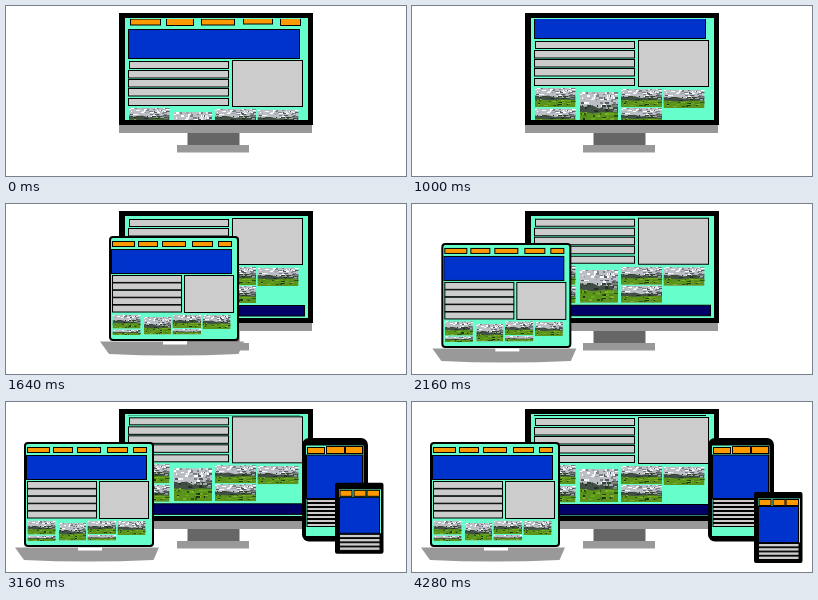
Recreate the animation shown at these times as an HTML page. Size 400 by 170 pixels, loop 8.44 s.

```html
<!DOCTYPE html>
<html lang="en">
<head>
<meta charset="utf-8">
<title>Responsive devices</title>
<style>
html, body { margin: 0; width: 100%; height: 100%; overflow: hidden; background: #fff; }
svg { display: block; width: 400px; height: 170px; }
.o { stroke: #000; stroke-width: 1; }
</style>
</head>
<body>
<svg viewBox="0 0 400 170">
  <defs>
    <symbol id="photo" viewBox="0 0 40 20" preserveAspectRatio="none"></symbol>
    <clipPath id="screen"><rect x="119" y="13" width="183" height="101"/></clipPath>
    <clipPath id="lid"><rect x="20" y="42" width="126" height="100"/></clipPath>
  </defs>
  <g id="monitor">
    <rect x="113" y="119" width="193" height="8" fill="#999"/>
    <rect x="181.500" y="127" width="52" height="12" fill="#666"/>
    <rect x="171" y="139" width="72" height="7.500" fill="#999"/>
    <rect x="113" y="7" width="194" height="112"/>
    <rect x="119" y="12" width="183" height="102" fill="#6fc"/>
    <g clip-path="url(#screen)"><g id="page"></g></g>
  </g>
  <g id="laptop">
    <path d="M9 145.500H153L147.500 158Q80 161 18 158Z" fill="#999"/>
    <rect x="72" y="145.500" width="24" height="3" fill="#fff"/>
    <rect x="19" y="41" width="128" height="103" rx="3" fill="#6fc" stroke="#000" stroke-width="2"/>
    <g id="lidPage" clip-path="url(#lid)"></g>
  </g>
  <g id="tablet">
    <rect x="296" y="36" width="66" height="103.500" rx="7"/>
    <rect x="300" y="43.500" width="57.500" height="90.500" fill="#6fc"/>
  </g>
  <g id="phone">
    <rect x="342" y="90" width="48.500" height="71" rx="2"/>
    <rect x="346" y="96.500" width="42" height="44" fill="#6fc"/>
  </g>
</svg>
<script>
const NS = 'http://www.w3.org/2000/svg';
const $ = id => document.getElementById(id);
const ORANGE = '#f90', BLUE = '#03c', GRAY = '#ccc', NAVY = '#006';

function add(parent, tag, attrs) {
  const el = document.createElementNS(NS, tag);
  for (const k in attrs) el.setAttribute(k, attrs[k]);
  parent.appendChild(el);
}
const box = (parent, fill, x, y, x2, y2) =>
  add(parent, 'rect', { x, y, width: x2 - x, height: y2 - y, fill, class: 'o' });
const buttons = (parent, y, y2, spans) =>
  spans.forEach(([a, b]) => box(parent, ORANGE, a, y, b, y2));
function rows(parent, x, x2, y, step, height, count) {
  for (let i = 0; i < count; i++) box(parent, GRAY, x, y + i * step, x2, y + i * step + height);
}
const photo = (parent, x, y, width, height) =>
  add(parent, 'use', { href: '#photo', x, y, width, height });

// Cloudy alpine meadow with seeded flecks
function drawPhoto(p) {
  let seed = 7;
  const rnd = () => (seed = seed * 16807 % 2147483647) / 2147483647;
  const flecks = (n, y, h, colors) => {
    for (let i = 0; i < n; i++) {
      add(p, 'rect', {
        x: Math.floor(rnd() * 38), y: y + Math.floor(rnd() * h), width: 1 + Math.floor(rnd() * 4), height: 1,
        fill: colors[Math.floor(rnd() * colors.length)], 'shape-rendering': 'crispEdges'
      });
    }
  };
  add(p, 'rect', { width: 40, height: 20, fill: '#bcc0c6' });
  flecks(80, 0, 9, ['#fff', '#fff', '#e4e6e8', '#7c828a', '#555b62', '#a2a8ae']);
  add(p, 'path', { d: 'M0 8L6 9L13 8L20 10L28 8L34 9L40 7V15H0Z', fill: '#414f47' });
  flecks(30, 8, 4, ['#243028', '#77807c', '#34452f', '#a0a8a8']);
  add(p, 'path', { d: 'M0 12L14 13L27 12L40 12.500V20H0Z', fill: '#5a941a' });
  flecks(36, 12, 7, ['#2f5214', '#86ad30', '#1d3310', '#6ba81e', '#4c8018']);
}

function build() {
  drawPhoto($('photo'));

  const page = $('page');
  buttons(page, 13, 19, [[124.5, 154.5], [195.5, 228.5]]);
  buttons(page, 12.5, 19.5, [[160.5, 187.5], [274.5, 294.5]]);
  buttons(page, 12, 18, [[237.5, 266.5]]);
  box(page, BLUE, 122.5, 23.5, 293.5, 52.5);
  box(page, GRAY, 123.5, 55.5, 222.5, 62.5);
  rows(page, 122.5, 222.5, 64.5, 9, 7.5, 3);
  box(page, GRAY, 122.5, 92.5, 222.5, 99.5);
  box(page, GRAY, 226.5, 54.5, 296.5, 100.5);
  photo(page, 123, 102, 40.5, 19);
  photo(page, 123, 122.5, 40.5, 17);
  photo(page, 168, 106, 38, 33);
  photo(page, 209, 103, 41, 18);
  photo(page, 209, 122, 41, 17);
  photo(page, 251.5, 103.5, 41, 18.5);
  box(page, NAVY, 122.5, 141.5, 298.5, 152);

  const lid = $('lidPage');
  buttons(lid, 45.5, 50.5, [[21.5, 43.5], [47.5, 66.5], [71.5, 94.5], [101.5, 121.5], [127.5, 140.5]]);
  box(lid, BLUE, 20.5, 53.5, 140.5, 77.5);
  rows(lid, 21.5, 90.5, 79.5, 7.4, 6.9, 5);
  box(lid, GRAY, 93.5, 79.5, 142.5, 116.5);
  photo(lid, 21.5, 118.5, 28, 14);
  photo(lid, 21.5, 133.5, 28, 5.5);
  photo(lid, 53, 121, 27, 17.5);
  photo(lid, 81.5, 118.5, 28.5, 13.5);
  photo(lid, 81.5, 133, 28.5, 5.5);
  photo(lid, 111.5, 119, 28, 14);

  const tablet = $('tablet');
  buttons(tablet, 45.5, 51.5, [[301.5, 318.5]]);
  buttons(tablet, 44.5, 51.5, [[320.5, 338.5], [339.5, 356.5]]);
  box(tablet, BLUE, 300.5, 53, 356.5, 96.5);
  rows(tablet, 301, 356.5, 97.5, 4, 3, 7);

  const phone = $('phone');
  buttons(phone, 97.5, 103.5, [[347, 359], [361, 373], [374, 386.5]]);
  box(phone, BLUE, 346.5, 104.5, 386.5, 140.5);
  rows(phone, 346.5, 387, 141.5, 4.2, 3.4, 4);
}

const FRAME = 40, LOOP = 8440, MOTION_END = 4280, SCROLL_END = 1650;
const clamp01 = v => Math.min(1, Math.max(0, v));
const move = (id, x, y) => $(id).setAttribute('transform', `translate(${x.toFixed(2)} ${y.toFixed(2)})`);

// Accelerating scroll, followed by a slow drift back
function scrollAt(t) {
  const s = Math.min(t, SCROLL_END) / 1000;
  const drift = clamp01((t - 2000) / (MOTION_END - 2000));
  return 13.14 * s + 6.86 * s * s - 1.36 * drift;
}

// Each device slides out linearly from (dx, dy) to its resting place
const slides = [
  { id: 'laptop', start: 1240, end: 2240, dx: 141.7, dy: -13.3 },
  { id: 'tablet', start: 2240, end: 3000, dx: -77, dy: 0 },
  { id: 'phone', start: 3000, end: 3680, dx: -17, dy: -12 }
];

function render(now) {
  const t = Math.floor((now % LOOP) / FRAME) * FRAME;
  move('page', 0, -scrollAt(Math.min(t, MOTION_END)));
  for (const { id, start, end, dx, dy } of slides) {
    const left = 1 - clamp01((t - start) / (end - start));
    $(id).style.display = t < start ? 'none' : '';
    move(id, dx * left, dy * left);
  }
}

build();
let origin;
function tick(now) {
  origin ??= now;
  render(now - origin);
  requestAnimationFrame(tick);
}
render(0);
requestAnimationFrame(tick);
</script>
</body>
</html>
```
